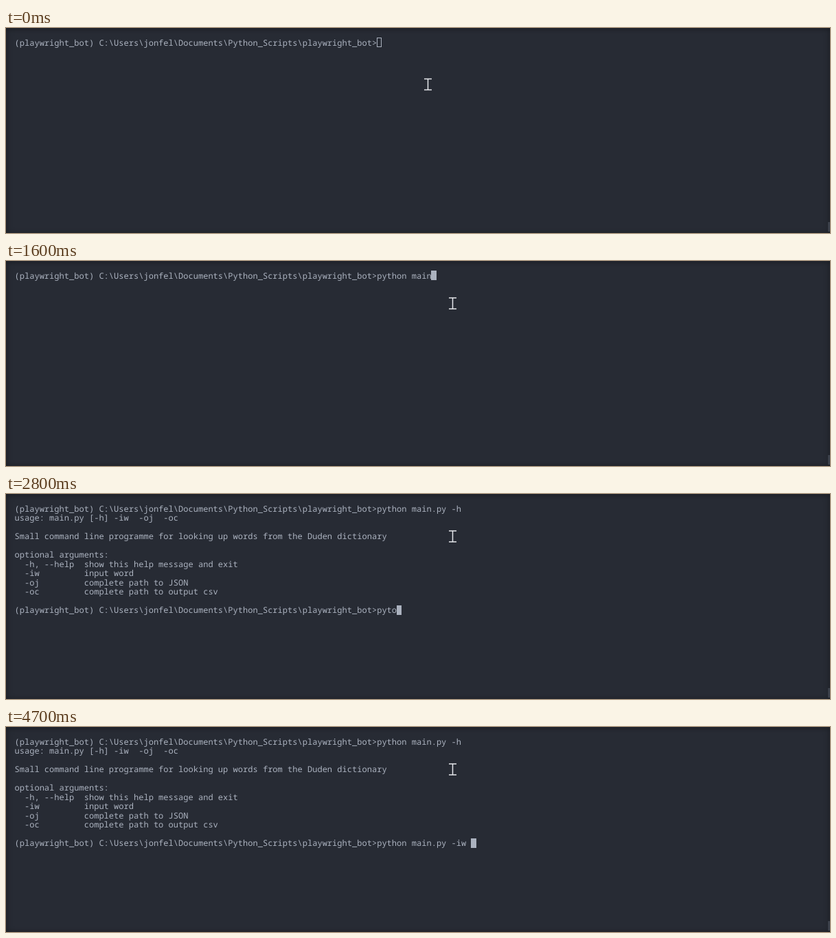
An HTML page for the animation above (5000 ms loop, 1200 by 300 pixels).

```html
<!DOCTYPE html>
<html lang="en">
<head>
<meta charset="utf-8">
<title>Terminal session</title>
<style>
  html, body { margin: 0; width: 100%; height: 100%; overflow: hidden; background: #272b34; }
  #stage { position: absolute; left: 0; top: 0; width: 1200px; height: 300px; overflow: hidden; }
  #shade { position: absolute; inset: 0; box-shadow: inset 0 1px 9px rgba(0, 0, 0, .4); }
  #screen {
    position: absolute; left: 12.5px; top: 14.8px; margin: 0; color: #abb2bf;
    font: 500 12.055px/13.5px "Noto Sans Mono", "DejaVu Sans Mono", monospace;
    font-variant-ligatures: none; text-rendering: geometricPrecision;
  }
  #caret { position: absolute; box-sizing: border-box; width: 7.6px; height: 14px; border: 1px solid #abb2bf; }
  #mouse { position: absolute; left: -8px; top: -12px; }
  #thumb { position: absolute; left: 1197px; top: 284px; width: 3px; height: 14px; background: #3b404a; }
</style>
</head>
<body>
<div id="stage">
  <div id="shade"></div>
  <div id="thumb"></div>
  <div id="caret"></div>
  <pre id="screen"></pre>
  <svg id="mouse" width="16" height="24" viewBox="-8 -12 16 24" fill="none">
    <path d="M-5.5-8H5.5M-5.5 8H5.5M0-8V8" stroke="#e6e8ec" stroke-width="1.5"/>
  </svg>
</div>
<script>
const $ = id => document.getElementById(id);
const [screen, caret, mouse, thumb] = ["screen", "caret", "mouse", "thumb"].map($);
const CELL = 7.233, LINE = 13.5, LOOP = 5000, STEP = 100;

const prompt = "(playwright_bot) C:\\Users\\jonfel\\Documents\\Python_Scripts\\playwright_bot>";
const command = prompt + "python main.py -h\n";
const help = command + `usage: main.py [-h] -iw  -oj  -oc

Small command line programme for looking up words from the Duden dictionary

optional arguments:
  -h, --help  show this help message and exit
  -iw         input word
  -oj         complete path to JSON
  -oc         complete path to output csv

`;

// Each entry: start time, text typed after the base
const typing = (base, list) => list.map(([time, text]) => [time, base + text]);
const states = [
  ...typing(prompt, [
    [0, ""], [600, "p"], [700, "py"], [800, "pyth"], [900, "python"], [1000, "python "],
    [1200, "python m"], [1400, "python ma"], [1500, "python mai"], [1600, "python main"],
    [1700, "python main.py"], [1900, "python main.py -"], [2000, "python main.py -h"]
  ]),
  [2100, command],
  [2400, help],
  ...typing(help + prompt, [
    [2500, ""], [2800, "pyto"], [2900, "pytohn"], [3100, "pyt"], [3200, "python"],
    [3300, "python m"], [3400, "python main"], [3500, "python main.py "],
    [4100, "python main.py -"], [4200, "python main.py -i"], [4300, "python main.py -iw "],
    [4600, "python main.py -iw  "], [4700, "python main.py -iw "]
  ])
];

const path = [[0, 614.5, 82.5], [200, 626, 76.5], [500, 626, 76.5], [800, 650.5, 62]];

function mouseAt(t) {
  const i = path.findIndex(p => p[0] > t);
  if (i < 0) return path.at(-1).slice(1);
  const [t0, x0, y0] = path[i - 1], [t1, x1, y1] = path[i];
  const k = (t - t0) / (t1 - t0);
  return [x0 + (x1 - x0) * k, y0 + (y1 - y0) * k];
}

function draw(now) {
  const t = Math.floor(now % LOOP / STEP) * STEP;
  const text = states.findLast(s => s[0] <= t)[1];
  if (screen.textContent !== text) screen.textContent = text;

  const rows = text.split("\n");
  caret.style.left = 11.8 + rows.at(-1).length * CELL + "px";
  caret.style.top = 14.2 + (rows.length - 1) * LINE + "px";
  caret.style.background = t < 600 ? "none" : "#abb2bf";

  const [x, y] = mouseAt(t);
  mouse.style.transform = `translate(${x}px, ${y}px)`;
  thumb.hidden = t >= 400 && t < 600;
  requestAnimationFrame(draw);
}

draw(0);
</script>
</body>
</html>
```
